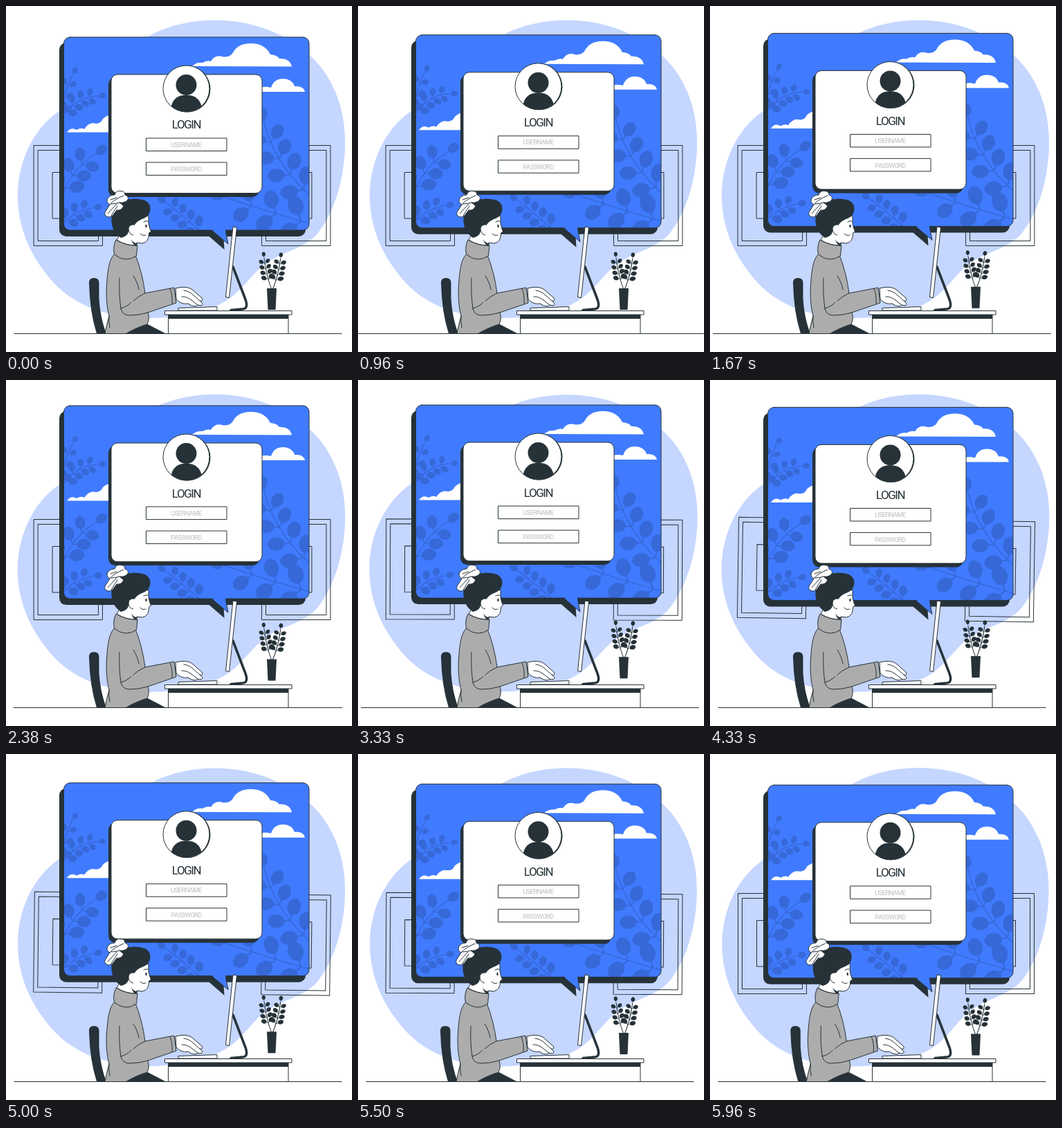
An HTML page for the animation above (6000 ms loop, 500 by 500 pixels).

```html
<!DOCTYPE html>
<html lang="en">
<head>
<meta charset="utf-8">
<title>Login</title>
<style>
  html, body { margin: 0; width: 100%; height: 100%; overflow: hidden; background: #fff; }
  svg { display: block; width: 100%; height: 100%; }
  .ink { fill: #263238; }
  .line { fill: none; stroke: #263238; stroke-linecap: round; stroke-linejoin: round; }
  .paper { fill: #fff; stroke: #263238; stroke-linejoin: round; }
  .wool { fill: #acacac; stroke: #263238; stroke-linejoin: round; }
  .blue { fill: #407bff; }
  .white { fill: #fff; }
  .stand { stroke-width: 3.5; }
  text { font-family: Roboto, "Liberation Sans", sans-serif; text-anchor: middle; }
  .title { font-size: 17px; letter-spacing: -1.4px; fill: #263238; }
  .hint { font-size: 9.4px; letter-spacing: -.6px; fill: #bdbdbd; }
</style>
</head>
<body>
<svg viewBox="0 0 500 500">
  <defs>
    <clipPath id="panelClip"><rect x="83.5" y="45.5" width="354" height="278" rx="9"/></clipPath>
    <clipPath id="faceClip"><circle cx="260.5" cy="119.500" r="33.500"/></clipPath>
  </defs>

  <path id="blob" fill="#c5d6ff" d="M300 20.500C365 20 421 47 454 87C479 119 490 157 490 197C490 245 476 297 450 329C428 354 396 354 369 377C348 396 338 416 311 430C282 445 245 451 206 451C141 450 91 431 58 387C29 350 17 312 17 274C17 229 36 181 75 153C119 120 150 82 193 52C224 30 262 21 300 20.500Z"/>

  <g id="pictures" class="line">
    <path id="picture" d="M40.500 201.500H139.500V346.500H40.500ZM46.500 208.500H133.500V339.500H46.500ZM67.500 240.500H113V307H67.500Z"/>
    <use href="#picture" transform="matrix(-1 0 0 1 509 0)"/>
  </g>

  <g id="bubble">
    <rect class="ink" x="77" y="53" width="356" height="280" rx="10"/>
    <path class="ink" d="M289 329L315.500 352L314 329Z"/>
    <path class="blue" stroke="#263238" d="M296 323L321 344L317 323Z"/>
    <rect class="blue" x="83.500" y="45" width="354.500" height="279" rx="9"/>
    <g id="foliage" clip-path="url(#panelClip)" fill="#3668d8" stroke="#3668d8" stroke-width="1.500"></g>
    <rect class="line" x="83.500" y="45" width="354.500" height="279" rx="9"/>
    <path class="blue" d="M297.500 322H316.500L317.500 326H301Z"/>
    <g class="white">
      <path d="M269 87Q275 81 284 82Q291 78 296 80Q302 70 312 73Q321 75 327 69Q334 54 354 54Q374 54 382 70Q392 71 395 76Q410 75 413 87.500Z"/>
      <path d="M360 124V120Q372 115 383 118Q387 105 401 105Q414 106 417 116Q430 115 432 124Z"/>
      <path d="M88 182.500Q94 174 102 179Q109 175 113 178Q120 167 130 170Q137 170 140 163Q146 157 156 157V182.500Z"/>
    </g>
    <rect class="ink" x="148" y="103" width="218" height="173" rx="10"/>
    <rect class="paper" x="152" y="99" width="218" height="171.500" rx="9"/>
    <circle class="ink" cx="262" cy="120" r="33.500"/>
    <circle class="paper" cx="260.500" cy="119.500" r="33.500"/>
    <g class="ink" clip-path="url(#faceClip)">
      <circle cx="260.500" cy="114" r="15"/>
      <path d="M238.500 155V147Q241 129 260.500 128.500Q280 129 283 147V155Z"/>
    </g>
    <text class="title" x="260.500" y="177.500">LOGIN</text>
    <rect class="paper" x="202.500" y="191" width="116.500" height="18.500"/>
    <rect class="paper" x="202.500" y="226" width="116.500" height="18.500"/>
    <text class="hint" x="260.500" y="203.700">USERNAME</text>
    <text class="hint" x="260.500" y="239.200">PASSWORD</text>
  </g>

  <path id="floor" class="line" d="M12 473.500H485"/>

  <g id="desk">
    <path class="line stand" d="M328 377L346 424Q351 438 341 438L325 439.500"/>
    <path class="paper" d="M328 319L333.500 320L322.500 421.500L317.500 420.500Z"/>
    <rect class="paper" x="234.500" y="446" width="173.500" height="27.500"/>
    <rect class="ink" x="234.500" y="446" width="173.500" height="6"/>
    <rect class="paper" x="229.500" y="440.500" width="183.500" height="5.500"/>
    <path class="paper" d="M249 436.500L305 434.500V440H249Z"/>
  </g>

  <g id="plant" class="ink">
    <g id="sprigs" stroke="#263238"></g>
    <path d="M377 408H391L389.500 439H378.500Z"/>
  </g>

  <g id="woman">
    <path class="ink" d="M120 401Q119.500 393 127 393Q134.500 393 134.500 400V423Q136 450 145 473.500H131Q121 442 120 401Z"/>
    <path class="ink" d="M174 473.500Q190 462 205 460L231 473.500Z"/>
    <path class="paper" d="M245 408Q259 404 268 409L283 422Q286 427 280 426L284 430Q284 434 277 432L274 434Q268 434 263 430Q254 432 246 424Z"/>
    <path class="line" d="M257 411Q265 412 271 418L280 426M254 420Q262 420 268 425L277 432"/>
    <path class="wool" d="M160 356C148 363 147 385 145.500 402C144 425 147 440 149 448Q145 462 143 473.500H173Q190 464 204 460Q208 452 205 443L246 429L243 407L201 415Q197 385 187 360Z"/>
    <path class="line" d="M164 393Q163 418 166 437Q168 447 179 447Q192 447 205 443M201 415Q190 420 184 426M166 437Q176 434 181 428M237 408.500Q241 418 240 430M149 448Q148 457 150 465M184 390Q190 399 192 410"/>
    <path class="wool" d="M159 338Q174 347 190 346L188.500 361Q173 372 156.500 359Q154 348 159 338Z"/>
    <path class="paper" d="M176 313L206 303V314Q207 320 209.500 326L206.500 328Q207 341 197 343L189 342L188 346Q173 346 160 338L166 328Z"/>
    <path class="ink" d="M181 337Q184 343 190 343L188.500 347Q183 345 181 337Z"/>
    <path class="ink" d="M152.500 305Q153 286 169 281Q188 276 201 281Q208.500 285 208.500 293Q208 303 199 307Q190 310 186 316Q178 316 177 323Q178 332 166 335Q151 325 152.500 305Z"/>
    <path class="paper" d="M186 316Q177 315 177 323Q178 330 184 331"/>
    <ellipse class="ink" cx="202.500" cy="318" rx="1.200" ry="2.300"/>
    <path class="line" d="M199 312Q202 310 205 311M194 329Q198 333 202 331"/>
    <path class="paper" d="M144 303Q141 300 145 295L150 287Q144 284 147 278Q150 273 157 273Q159 266 167 267.500Q172 268 172 273Q178 275 176 280Q172 285 164 284L170 289Q167 296 160 295L154 303Q148 307 144 303Z"/>
    <path class="line" d="M150 287Q157 279 170 274M152 286Q158 286 164 284M147 300L160 286M152 303L161 289M151 280L160 277"/>
  </g>
</svg>
<script>
const LOOP = 6000;
const $ = id => document.getElementById(id);

// A curved stem [x0,y0, cx,cy, x1,y1] with pairs of stalked leaves and one at the tip.
function branch([x0, y0, cx, cy, x1, y1], pairs, size, from = .15) {
  const mix = (a, b, c, t) => (1 - t) ** 2 * a + 2 * t * (1 - t) * b + t * t * c;
  const slope = (a, b, c, t) => (1 - t) * (b - a) + t * (c - b);
  const leaf = (x, y, deg, len) =>
    `<path stroke="none" transform="translate(${x} ${y}) rotate(${deg}) scale(${len})"
      d="M0 -.03L.25 -.03C.35 -.4 .95 -.42 1.05 0C.95 .42 .35 .4 .25 .03L0 .03Z"/>`;
  let out = `<path fill="none" d="M${x0} ${y0}Q${cx} ${cy} ${x1} ${y1}"/>`;
  for (let i = 0; i <= pairs; i++) {
    const t = from + (1 - from) * i / pairs;
    const x = mix(x0, cx, x1, t), y = mix(y0, cy, y1, t);
    const deg = Math.atan2(slope(y0, cy, y1, t), slope(x0, cx, x1, t)) * 180 / Math.PI;
    const len = size * (1.1 - .25 * t);
    out += i === pairs ? leaf(x, y, deg, len)
      : leaf(x, y, deg - 55, len) + leaf(x, y, deg + 55, len);
  }
  return out;
}

$('foliage').innerHTML =
  branch([80, 165, 82, 125, 96, 100], 3, 14) +
  branch([80, 162, 100, 132, 131, 130], 4, 15) +
  branch([80, 275, 95, 237, 126, 216], 3, 26) +
  branch([80, 316, 100, 296, 124, 292], 3, 17) +
  branch([286, 330, 258, 305, 233, 286], 4, 18) +
  branch([446, 280, 390, 232, 374, 172], 4, 31) +
  branch([446, 316, 380, 298, 322, 278], 3, 34);

const sprig = branch([384, 410, 376, 390, 373, 364], 4, 10, .35);
$('sprigs').innerHTML = sprig + `<g transform="matrix(-1.1 0 0 1 807 1)">${sprig}</g>`;

// Motions; those with a delay rest until their own time turns positive.
const bob = t => t < 0 ? 0 : -10 * (1 - Math.abs(1 - t / 3000));
const sway = t => t < 0 ? 0 : Math.asin(Math.sin(2 * Math.PI * t / LOOP)) * 2 / Math.PI;
const drift = t => -4 * Math.max(0, t / 1000) ** 2;
const pulse = (t, from, peak, to) =>
  Math.max(0, Math.min((t - from) / (peak - from), (to - t) / (to - peak)));

function pose(t) {
  const set = (id, value) => $(id).setAttribute('transform', value);
  const stretch = 1 + .075 * (pulse(t, 0, 600, 2450) + pulse(t, 2450, 2950, 3600));
  set('bubble', `translate(0 ${bob(t)})`);
  set('plant', `translate(0 ${bob(t - 1000)})`);
  set('blob', `rotate(${sway(t - 2000)} 253.5 236)`);
  set('pictures', `rotate(${sway(t - 3000)} 254.5 274)`);
  set('woman', `translate(${drift(t - 5000)} 0)`);
  set('floor', `translate(248.5 0) scale(${stretch} 1) translate(-248.5 0)`);
}

const start = performance.now();
function tick() {
  pose((performance.now() - start) % LOOP);
  requestAnimationFrame(tick);
}
pose(0);
requestAnimationFrame(tick);
</script>
</body>
</html>
```
